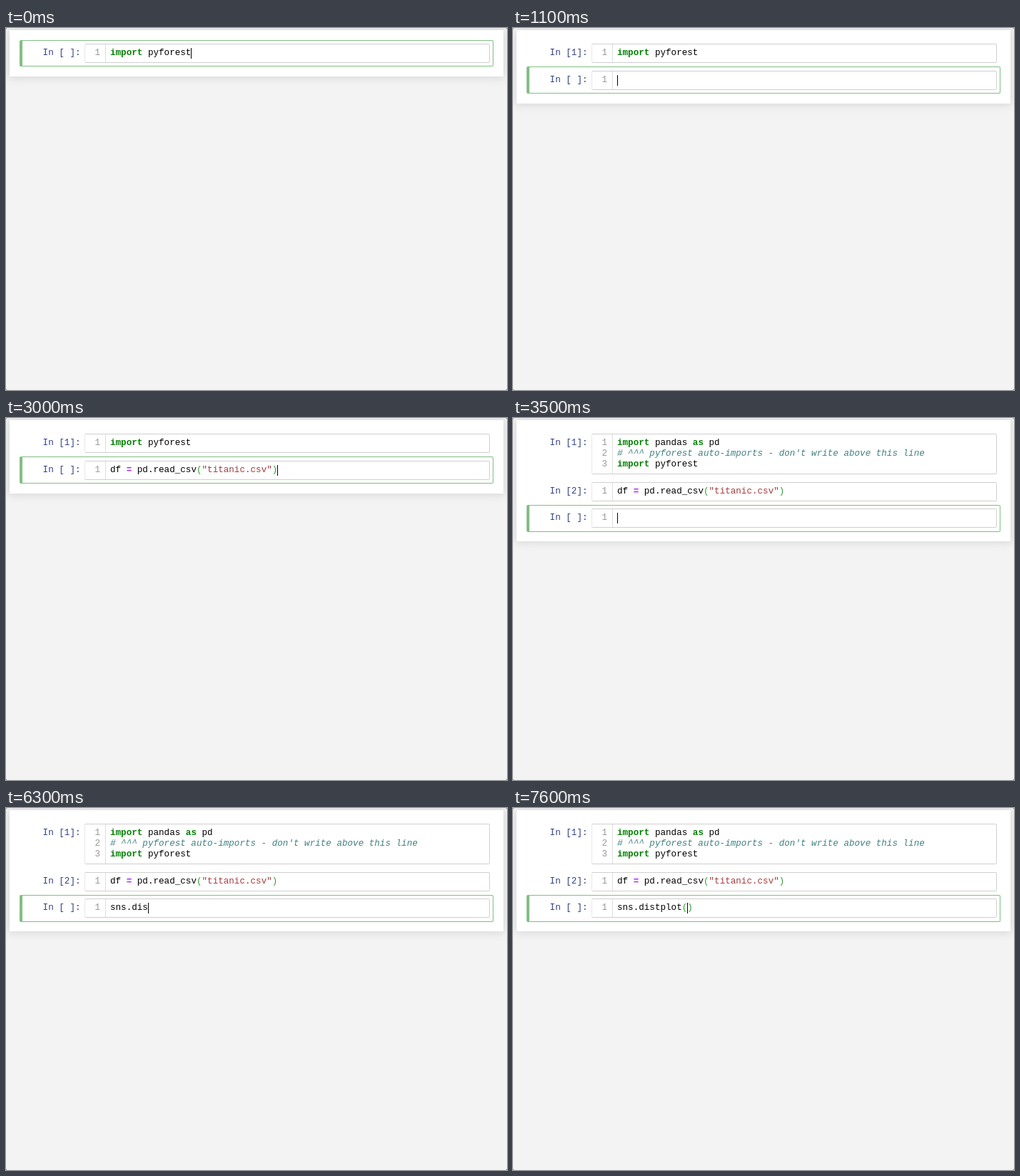
Animation, 702 px wide and 508 px high, one loop 8000 ms. Source, as an HTML page:

```html
<!DOCTYPE html>
<html lang="en">
<head>
<meta charset="utf-8">
<title>Notebook auto-imports</title>
<style>
  html, body { margin: 0; width: 100%; height: 100%; overflow: hidden; background: #666; }
  #stage { position: relative; width: 702px; height: 508px; overflow: hidden;
    background: #f3f3f3; border-radius: 2px; }
  #stage div { position: absolute; box-sizing: border-box; }
  #panel { left: 5px; top: 3px; width: 692px; background: #fff;
    box-shadow: 0 0 12px 1px rgba(87, 87, 87, .2); }
  #selected { left: 19px; width: 664px; border: 1px solid #80bf83; border-left-width: 4px;
    border-radius: 2px; }
  .input { left: 110px; width: 568px; border: 1px solid #cfcfcf; border-left-color: #e8e8e8;
    border-radius: 2px; }
  .gutter { left: 28px; top: 0; width: 1px; height: 100%; background: #ddd; }
  .text { font: 12.6px/15px "Liberation Mono", monospace; white-space: pre; }
  .prompt { left: 22px; width: 82.5px; text-align: right; color: #303f80; }
  .number { left: 112px; width: 20px; text-align: right; color: #999; }
  .code { left: 146px; color: #000; }
  .key { color: #008000; font-weight: bold; }
  .op { color: #a2f; font-weight: bold; }
  .str { color: #a63a3a; }
  .par { color: #2fa02f; }
  .note { color: #408080; font-style: italic; }
  #caret { width: 1px; height: 15px; background: #000; }
</style>
</head>
<body>
<div id="stage">
  <div id="panel"></div>
  <div id="cells"></div>
  <div id="selected"></div>
  <div id="caret"></div>
</div>
<script>
const LOOP = 8000, CHAR = 7.561, LINE = 15;
const byId = id => document.getElementById(id);
const span = (kind, text) => `<span class="${kind}">${text}</span>`;

const importForest = span('key', 'import') + ' pyforest';
const importLines = [
  span('key', 'import') + ' pandas ' + span('key', 'as') + ' pd',
  span('note', "# ^^^ pyforest auto-imports - don't write above this line"),
  importForest
];
const readCsv = `df ${span('op', '=')} pd.read_csv${span('par', '(')}` +
  span('str', '"titanic.csv"') + span('par', ')');

// Each layout: panel height, selection top and height, cells as [top, label, lines].
const layouts = {
  first: line => ({ panel: 65, top: 17, height: 37, cells: [[22, ' ', [line]]] }),
  second: line => ({ panel: 103, top: 54, height: 38,
    cells: [[22, '1', [importForest]], [60, ' ', [line]]] }),
  third: line => ({ panel: 170, top: 122, height: 38,
    cells: [[22, '1', importLines], [90, '2', [readCsv]], [127, ' ', [line]]] })
};

// Start time, layout, text of the active cell, caret column.
const steps = [
  [0, 'first', importForest, 15],
  [1100, 'second', '', 0],
  [2000, 'second', readCsv, 31],
  [3500, 'third', '', 0],
  [4300, 'third', 's', 1],
  [4400, 'third', 'sn', 2],
  [4500, 'third', 'sns', 3],
  [4800, 'third', 'sns.', 4],
  [5000, 'third', 'sns.d', 5],
  [5100, 'third', 'sns.di', 6],
  [5200, 'third', 'sns.dis', 7],
  [6400, 'third', 'sns.dist', 8],
  [7000, 'third', 'sns.distplot', 12],
  [7500, 'third', 'sns.distplot' + span('par', '()'), 13]
];
const caretOff = [[500, 1100], [1600, 2000], [2500, 3000], [4000, 4300], [5800, 6300]];

function textAt(kind, top, html) {
  return `<div class="text ${kind}" style="top:${top}px">${html}</div>`;
}

function cellHtml([top, label, lines]) {
  const height = 12 + lines.length * LINE;
  return `<div class="input" style="top:${top}px;height:${height}px"><div class="gutter"></div></div>` +
    textAt('prompt', top + 6, `In [${label}]:`) +
    lines.map((line, i) => {
      const y = top + 6 + i * LINE;
      return textAt('number', y, i + 1) + textAt('code', y, line);
    }).join('');
}

function showStep([, layout, line, column]) {
  const view = layouts[layout](line);
  byId('panel').style.height = view.panel + 'px';
  byId('cells').innerHTML = view.cells.map(cellHtml).join('');
  Object.assign(byId('selected').style, { top: view.top + 'px', height: view.height + 'px' });
  const activeTop = view.cells[view.cells.length - 1][0];
  Object.assign(byId('caret').style, {
    left: Math.round(146 + column * CHAR) + 'px', top: activeTop + 6 + 'px'
  });
}

let shown = null;
function draw() {
  const time = performance.now() % LOOP;
  const step = steps.filter(([start]) => start <= time).pop();
  if (step !== shown) showStep(shown = step);
  const hidden = caretOff.some(([from, to]) => time >= from && time < to);
  byId('caret').style.visibility = hidden ? 'hidden' : 'visible';
  requestAnimationFrame(draw);
}
draw();
</script>
</body>
</html>
```
